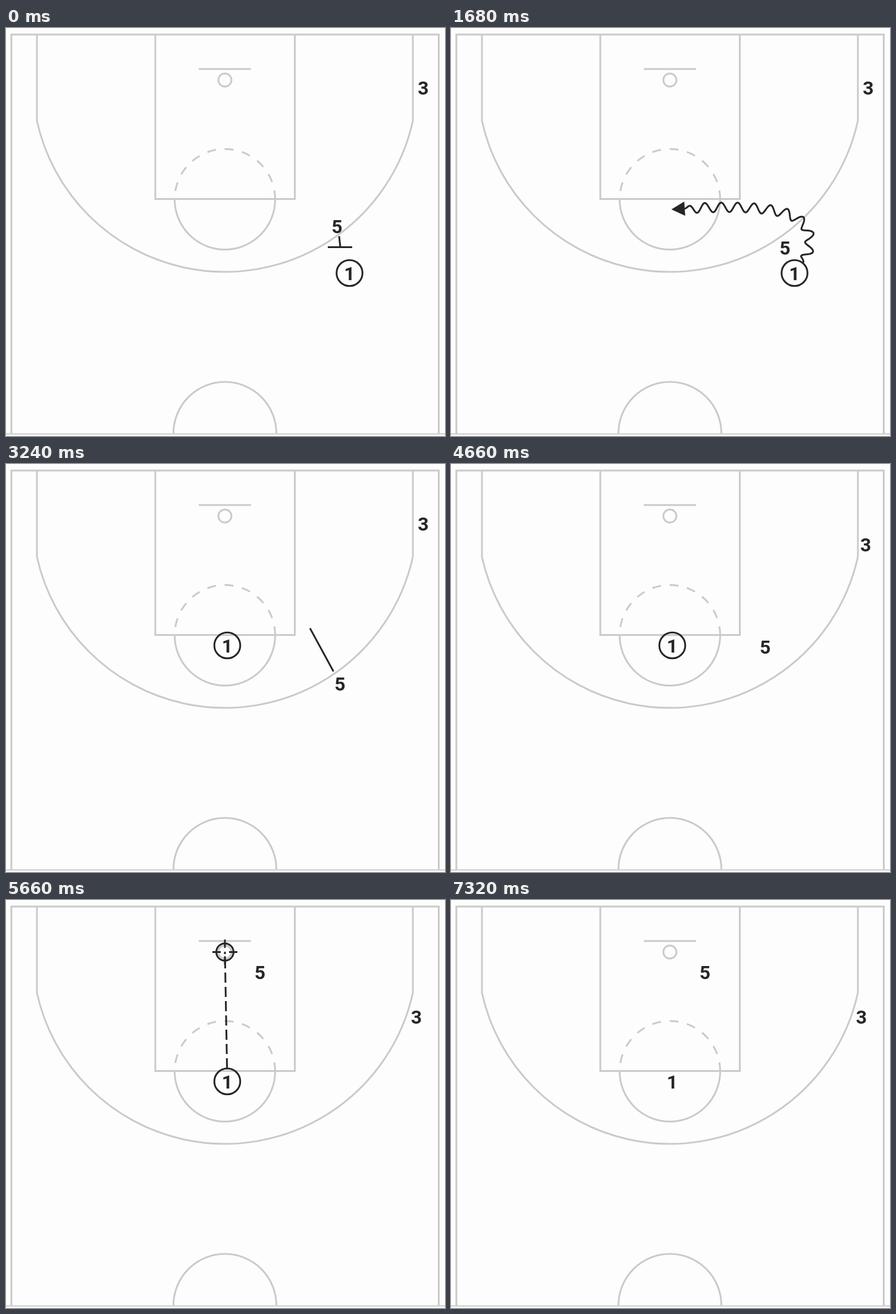
These frames come from a looping animation (738 by 686 pixels, 7360 ms). An HTML page with a canvas:

```html
<!DOCTYPE html>
<html>
<head>
<meta charset="utf-8">
<style>
html, body { margin: 0; width: 100%; height: 100%; overflow: hidden; background: #fdfdfd; }
canvas { display: block; }
</style>
</head>
<body>
<canvas id="stage" width="738" height="686"></canvas>
<script>
const ctx = document.getElementById('stage').getContext('2d');
const LOOP = 7360, INK = '#262626', COURT = '#cacaca', PAPER = '#fdfdfd';
const HOLDS = [2200, 4440, 5960]; // short pauses before each move

function makePath(d) {
  const el = document.createElementNS('http://www.w3.org/2000/svg', 'path');
  el.setAttribute('d', d);
  const length = el.getTotalLength();
  return { length, at: s => { const p = el.getPointAtLength(s); return [p.x, p.y]; } };
}
const screenMove = makePath('M556.5 333L561.5 369');
const dribble = makePath('M577.5 412C608 380 612 345 586 323C556 300 480 298 372 305');
const roll = makePath('M561.5 369L427 121.5');
const lift = makePath('M701.5 100L690 196.5');
const shot = makePath('M372 305L368 87');

const progress = (t, start, duration) => Math.min(1, Math.max(0, (t - start) / duration));
const along = (path, k) => path.at(path.length * k);

function stroke(points, color = INK, width = 3, dash = []) {
  ctx.beginPath();
  points.forEach(([x, y]) => ctx.lineTo(x, y));
  ctx.strokeStyle = color;
  ctx.lineWidth = width;
  ctx.setLineDash(dash);
  ctx.stroke();
}

function arc(x, y, r, from = 0, to = Math.PI * 2, color = INK, dash = [], back = false) {
  ctx.beginPath();
  ctx.arc(x, y, r, from, to, back);
  ctx.strokeStyle = color;
  ctx.lineWidth = 3;
  ctx.setLineDash(dash);
  ctx.stroke();
}

function drawCourt() {
  const cx = 368, line = p => stroke(p, COURT);
  ctx.fillStyle = PAPER;
  ctx.fillRect(0, 0, 738, 686);
  line([[9, 683], [9, 11], [727.5, 11], [727.5, 683]]);
  stroke([[0, 682.5], [738, 682.5]], COURT, 2);
  line([[251, 11], [251, 287.5], [485.5, 287.5], [485.5, 11]]);
  line([[324, 69], [412, 69]]);
  line([[52, 11], [52, 156]]);
  line([[684, 11], [684, 156]]);
  const corner = Math.atan2(156 - 86.4, 316);
  arc(cx, 86.4, 323.6, corner, Math.PI - corner, COURT);
  arc(cx, 87.5, 11, 0, Math.PI * 2, COURT);
  arc(cx, 288, 84.5, 0, Math.PI, COURT);
  arc(cx, 288, 84.5, 0, Math.PI, COURT, [15, 14.5], true);
  arc(cx, 681.5, 86.5, Math.PI, Math.PI * 2, COURT);
}

function arrowHead(path) {
  const [x, y] = path.at(path.length), [bx, by] = path.at(path.length - 4);
  ctx.save();
  ctx.translate(x, y);
  ctx.rotate(Math.atan2(y - by, x - bx));
  ctx.beginPath();
  ctx.moveTo(1.5, 0);
  ctx.lineTo(-21, -12);
  ctx.lineTo(-21, 12);
  ctx.fillStyle = INK;
  ctx.fill();
  ctx.restore();
}

function drawCut(path, k) {
  if (k <= 0) return;
  const start = 23, end = path.length - 20;
  stroke([path.at(start), path.at(start + (end - start) * k)]);
  if (k === 1) arrowHead(path);
}

function drawDribble(k) {
  if (k <= 0) return;
  const start = 22, end = dribble.length - 20, crest = dribble.length - 55;
  const points = [];
  for (let s = start; s <= start + (end - start) * k; s++) {
    const [x, y] = dribble.at(s), [x0, y0] = dribble.at(s - 1), [x1, y1] = dribble.at(s + 1);
    const d = Math.hypot(x1 - x0, y1 - y0);
    const size = 8 * Math.min(1, (s - start) / 8, (end - s) / 16);
    const swing = size * Math.cos((s - crest) / 27.4 * Math.PI * 2);
    points.push([x - (y1 - y0) / d * swing, y + (x1 - x0) / d * swing]);
  }
  stroke(points);
  if (k === 1) arrowHead(dribble);
}

function drawShot(k) {
  if (k <= 0) return;
  stroke([shot.at(22), shot.at(22 + (shot.length - 22) * k)], INK, 3, [17, 7]);
  if (k < 1) return;
  const x = 368, y = 87.5;
  arc(x, y, 14.5);
  for (const [dx, dy] of [[1, 0], [-1, 0], [0, 1], [0, -1]])
    stroke([[x + dx * 7, y + dy * 7], [x + dx * 21, y + dy * 21]]);
}

function player(label, [x, y]) {
  ctx.fillStyle = INK;
  ctx.font = '700 32px Roboto, sans-serif';
  ctx.textAlign = 'center';
  ctx.fillText(label, x, y + 11.5);
}

function render(t) {
  for (const h of HOLDS) if (t >= h && t < h + 100) t = h;
  drawCourt();

  if (t < 20) {
    stroke([[560, 350], [562, 368]]);
    stroke([[541, 368.5], [582, 368.5]]);
  }
  if (t <= 2200) drawDribble(progress(t, 1090, 570));
  if (t <= 4440) {
    drawCut(roll, progress(t, 3110, 378));
    drawCut(lift, progress(t, 3490, 190));
  }
  if (t <= 5960) drawShot(progress(t, 5300, 320));

  const one = along(dribble, progress(t, 2270, 840));
  const five = t <= 4440
    ? along(screenMove, progress(t, 20, 1060))
    : along(roll, progress(t, 4450, 853));
  player('1', one);
  player('5', five);
  player('3', along(lift, progress(t, 4450, 575)));

  if (t < 7320) {
    const [x, y] = t <= 5960 ? one : along(shot, progress(t, 6000, 840));
    arc(x, y, 21.8);
  }
}

const began = performance.now();
function tick() {
  render((performance.now() - began) % LOOP);
  requestAnimationFrame(tick);
}
tick();
</script>
</body>
</html>
```
